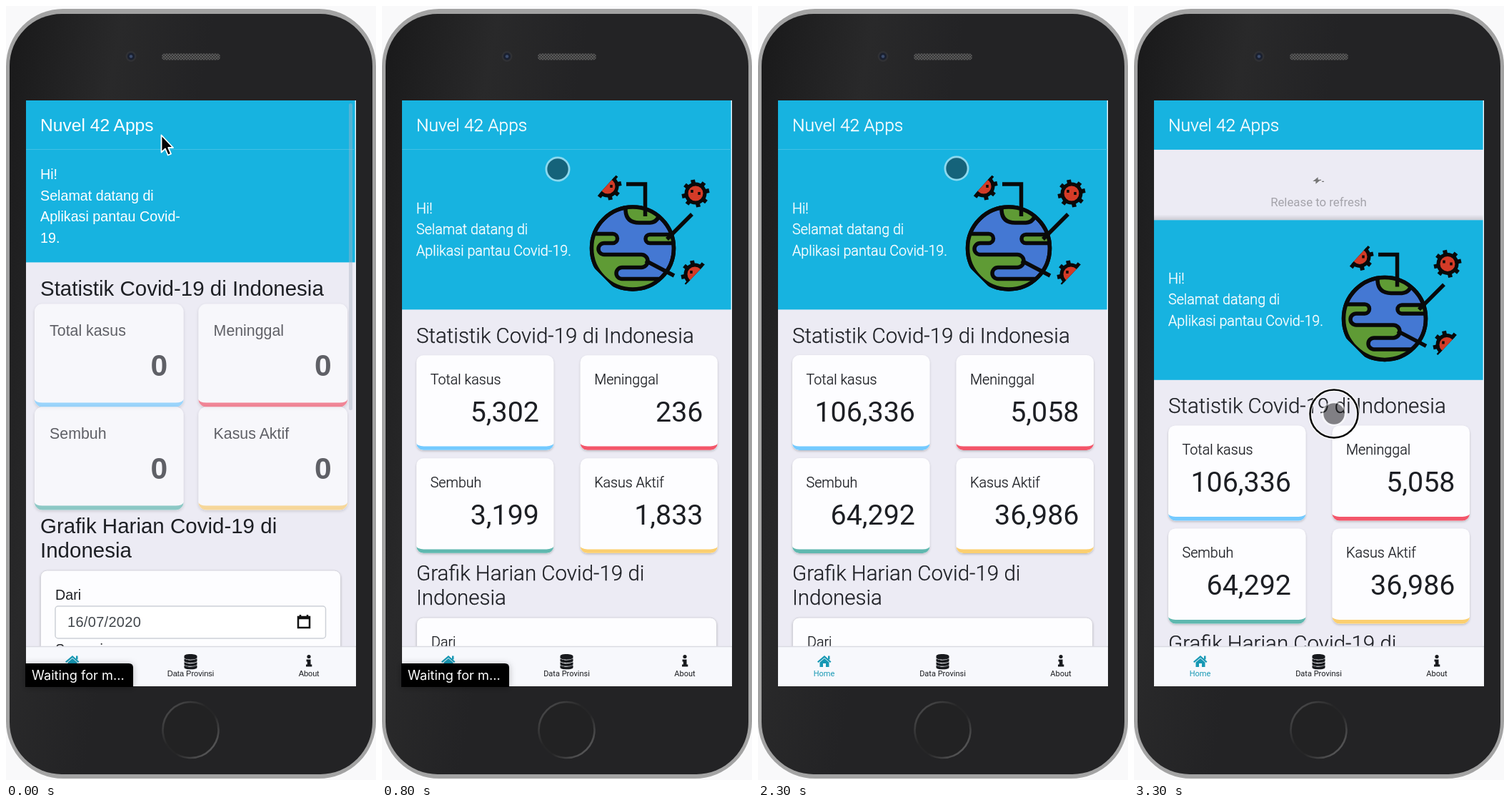
Animation, 518 px wide and 1082 px high, one loop 3400 ms. Source, as an HTML page:

```html
<!DOCTYPE html>
<html lang="id">
<head>
<meta charset="utf-8">
<title>Nuvel 42 Apps</title>
<style>
  html, body { margin: 0; width: 100%; height: 100%; overflow: hidden; background: #f9f9fa; }
  svg { display: block; width: 100vw; height: 100vh; }
  text { white-space: pre; }
  #app { font: 300 19.7px Roboto, sans-serif; fill: #1d1f24; }
  #app.plain { font-family: "Liberation Sans", Arial, sans-serif; font-weight: 400; }
  #below text { stroke: #1d1f24; stroke-width: .25px; }
  #app.plain text, #below .num, #below .date { stroke: none; }
  .title { font-size: 24.6px; }
  .title, .hero { fill: #fff; stroke: #fff; stroke-width: .35px; }
  .head { font-size: 29.5px; }
  .num { font-size: 39.4px; font-weight: 400; text-anchor: end; }
  .plain .num { font-weight: 700; }
  .nav { font-size: 11px; font-weight: 400; text-anchor: middle; }
  .pull { font-size: 16.8px; font-weight: 400; text-anchor: middle; fill: #a4a3aa; }
  .date { font: 400 20px "Liberation Sans", Arial, sans-serif; letter-spacing: .3px; fill: #41464b; }
  .wait { font: 400 18.2px Inter, sans-serif; fill: #fff; }
</style>
</head>
<body>
<svg viewBox="0 0 518 1082" preserveAspectRatio="none">
  <defs>
    <linearGradient id="body" x1="0" y1="0" x2=".5" y2=".18">
      <stop offset="0" stop-color="#19191a"/><stop offset=".55" stop-color="#29292a"/><stop offset="1" stop-color="#232325"/>
    </linearGradient>
    <linearGradient id="ring" x1="0" y1="0" x2="1" y2="1">
      <stop offset="0" stop-color="#555556"/><stop offset=".42" stop-color="#262627"/>
      <stop offset=".58" stop-color="#262627"/><stop offset="1" stop-color="#6c6c6d"/>
    </linearGradient>
    <linearGradient id="inset" x1="0" y1="0" x2="0" y2="1">
      <stop offset="0" stop-color="#000" stop-opacity="0"/><stop offset="1" stop-color="#000" stop-opacity=".14"/>
    </linearGradient>
    <pattern id="mesh" width="4" height="4" patternUnits="userSpaceOnUse">
      <rect width="4" height="4" fill="#5c5c5c"/><path d="M0 0h2v2h-2zM2 2h2v2h-2z" fill="#363637"/>
    </pattern>
    <filter id="soft" x="-10%" y="-10%" width="120%" height="125%">
      <feDropShadow dx="0" dy="1.5" stdDeviation="1.8" flood-color="#000" flood-opacity=".22"/>
    </filter>
    <filter id="glow" x="-20%" y="-60%" width="140%" height="220%">
      <feDropShadow dx="0" dy="1" stdDeviation="5" flood-color="#000" flood-opacity=".28"/>
    </filter>
    <clipPath id="view"><rect x="28" y="200" width="462" height="696"/></clipPath>
    <clipPath id="globe"><circle cx="351" cy="338.500" r="57.500"/></clipPath>
    <clipPath id="edge"><path d="M280 349L344 413H480V230H280Z"/></clipPath>
    <clipPath id="cutA"><path d="M301 266L329 235H345V275H301Z"/></clipPath>
    <clipPath id="cutC"><path d="M457 356L423 392H410V350H457Z"/></clipPath>
    <g id="virus" stroke="#090909">
      <path d="M-19 4L19 -4M-4 -19L4 19M-15 -12L15 12M-12 15L12 -15" stroke-width="6"/>
      <circle r="13" fill="#d33b27" stroke-width="5"/>
      <path d="M-5 -5V-1M5 -2V2" stroke-width="3.500"/>
    </g>
  </defs>

  <rect x="0" y="4" width="518" height="1076" rx="80" fill="#a3a3a3"/>
  <rect x="5" y="11" width="508" height="1063" rx="73" fill="url(#body)"/>
  <circle cx="175" cy="70.500" r="7.500" fill="#303134"/>
  <circle cx="175" cy="70.500" r="5" fill="#1a2030"/><circle cx="175" cy="70.500" r="2.300" fill="#3c4c6c"/>
  <rect x="218" y="66.500" width="82" height="9" rx="4.500" fill="url(#mesh)"/>
  <circle cx="258.500" cy="1012" r="39" fill="#222223" stroke="url(#ring)" stroke-width="2.600"/>

  <g id="app">
    <rect x="28" y="132" width="462" height="819" fill="#ecebf4"/>
    <g clip-path="url(#view)">
      <g id="pull">
        <rect x="28" y="193" width="461" height="8" fill="url(#inset)"/>
        <path id="spark" d="M252 146l5 -4v3h3l-5 4v-3zM260 145h2M263 147h3" fill="#777" stroke="#777" stroke-width="1.200"/>
        <text id="pullText" class="pull" x="258.500" y="182"></text>
      </g>
      <g id="page">
        <rect id="hero" x="28" y="200.900" width="461" fill="#17b3e0"/>
        <g id="heroText" class="hero"></g>
        <g id="art">
          <g fill="none" stroke="#090909" stroke-width="5.500" clip-path="url(#edge)">
            <circle cx="351" cy="338.500" r="57.500" fill="#4478d3"/>
            <g clip-path="url(#globe)" fill="#5f9b35">
              <path d="M285 318.500H323A6.500 6.500 0 0 1 323 331.500H311A8 8 0 0 0 311 347.500H363A9 9 0 0 1 363 365.500H336A8 8 0 0 0 336 381.500H400V405H285Z"/>
              <path d="M341 270V286Q342 303 360 303H375Q388 302 389 286V270Z"/>
              <path d="M420 319.500H375A6 6 0 0 0 375 331.500H420Z"/>
            </g>
            <circle cx="351" cy="338.500" r="57.500"/>
            <path d="M342 249H368.500V294M434 291L399 326M369 356L409 377"/>
          </g>
          <g clip-path="url(#cutA)"><use href="#virus" x="316" y="252"/></g>
          <use href="#virus" x="439" y="262"/>
          <g clip-path="url(#cutC)"><use href="#virus" x="438" y="375"/></g>
        </g>
        <g id="below">
          <text class="head" x="48" y="471">Statistik Covid-19 di Indonesia</text>
          <g id="cards"></g>
          <text class="head" x="48" y="803">Grafik Harian Covid-19 di</text>
          <text class="head" x="48" y="837">Indonesia</text>
          <rect x="48.500" y="855" width="420" height="300" rx="9" fill="#fdfdff" stroke="#d5d4dc" filter="url(#soft)"/>
          <text x="69" y="896">Dari</text>
          <rect x="69" y="905" width="378.500" height="45" rx="4" fill="#fff" stroke="#cdd1d7" stroke-width="1.500"/>
          <text class="date" x="86" y="934">16/07/2020</text>
          <path d="M409 920h16v15h-16zM409 922h16M412 917v3M422 917v3" fill="none" stroke="#111" stroke-width="2.500"/>
          <text x="69" y="972">Sampai</text>
        </g>
      </g>
    </g>

    <rect x="28" y="132" width="461" height="68.900" fill="#17b3e0"/>
    <path d="M489.300 132V951" stroke="#f6fbff" stroke-width="1.300"/>
    <path id="line" d="M28 200.500H489" stroke="#43bfe4"/>
    <text class="title" x="48" y="174.500">Nuvel 42 Apps</text>
    <rect id="bar" x="480" y="136" width="5" height="429" rx="2.500" fill="#a9b2c4" opacity=".42"/>

    <rect x="28" y="895" width="462" height="56" fill="#f7f8fc"/>
    <path d="M28 895.500H490" stroke="#dadbe2" stroke-width="1.500"/>
    <g fill="#1798b4">
      <path d="M83 916.500L93 908L102.500 916.500L101 918L93 911L84.500 918Z"/>
      <path d="M98 908.500h2.500v5h-2.500zM86.500 917.500L93 912L99.500 917.500V924H95V919H91V924H86.500Z"/>
      <text class="nav" x="92.500" y="937">Home</text>
    </g>
    <g fill="#181a1e">
      <path d="M249.500 909C249.500 905 267.500 905 267.500 909V911C267.500 914.500 249.500 914.500 249.500 911Z"/>
      <path id="band" d="M249.500 912.500Q258.500 916.500 267.500 912.500V915.500C267.500 919 249.500 919 249.500 915.500Z"/>
      <use href="#band" y="4.700"/><use href="#band" y="9.200"/>
      <circle cx="424" cy="909.500" r="2.600"/>
      <path d="M420.500 913.500H426.500V920.500H428.300V923.500H420V920.500H421.800V916.500H420.500Z"/>
      <text class="nav" x="258.500" y="937">Data Provinsi</text>
      <text class="nav" x="424" y="937">About</text>
    </g>
  </g>

  <g id="wait">
    <path d="M27 919H172Q178 919 178 925V952H27Z" fill="#050505" filter="url(#glow)"/>
    <text class="wait" x="36" y="942">Waiting for m...</text>
  </g>
  <path id="arrow" d="M217.500 180.500V204.500L223 199.500L226.800 208.500L231 206.700L227.200 198H234Z" fill="#050505" stroke="#fff" stroke-width="1.800" stroke-linejoin="round"/>
  <g id="touch">
    <circle r="16" fill="none" stroke="#fff" stroke-opacity=".5" stroke-width="3"/>
    <circle r="14.700" fill="#141414" fill-opacity=".5"/>
    <g id="press" fill="none">
      <circle r="33.500" stroke="#fff" stroke-opacity=".85" stroke-width="5"/>
      <circle r="33.500" stroke="#080808" stroke-width="2.600"/>
    </g>
  </g>
</svg>
<script>
const LOOP = 3400, STEP = 100, ZOOM = 1.23;
const $ = id => document.getElementById(id);
const show = (id, on) => $(id).setAttribute('display', on ? 'inline' : 'none');
const shift = (id, x, y) => $(id).setAttribute('transform', `translate(${x} ${y})`);

const stats = [
  { label: 'Total kasus', end: 106336, color: '#74caff', x: 48, y: 488 },
  { label: 'Meninggal', end: 5058, color: '#f3566a', x: 277.5, y: 488 },
  { label: 'Sembuh', end: 64292, color: '#5fb8af', x: 48, y: 632 },
  { label: 'Kasus Aktif', end: 36986, color: '#fbcf70', x: 277.5, y: 632 }
];
$('cards').innerHTML = stats.map(s => `<g>
  <rect x="${s.x}" y="${s.y}" width="192.500" height="133" rx="10" fill="#fdfdff" filter="url(#soft)"/>
  <path transform="translate(${s.x} ${s.y})" fill="${s.color}"
    d="M0 123A10 10 0 0 0 10 133H182.500A10 10 0 0 0 192.500 123A10 4.500 0 0 1 182.500 127.500H10A10 4.500 0 0 1 0 123Z"/>
  <text x="${s.x + 19.5}" y="${s.y + 41}">${s.label}</text>
  <text class="num" x="${s.x + 172}" y="${s.y + 93}">0</text></g>`).join('');
const cards = [...$('cards').children];
const nums = cards.map(c => c.querySelector('.num'));

// Each key is [time, ...values]
const scaleKeys = [[0, 1.083], [100, 1.04], [200, .95], [300, .917], [400, .955], [500, 1.02], [600, 1.005], [700, .98], [800, .998], [900, 1]];
const fadeKeys = [[0, .68], [300, .88], [600, 1]];
const touchKeys = [[600, 238, 205], [800, 246, 228], [1500, 256, 268], [2300, 278, 227], [2600, 277, 235],
  [2900, 276, 272], [3000, 276, 297], [3100, 277, 346], [3200, 279, 450], [3300, 280, 570]];

function at(keys, t) {
  const i = keys.findIndex(k => k[0] > t);
  if (i < 0) return keys[keys.length - 1].slice(1);
  if (i === 0) return keys[0].slice(1);
  const a = keys[i - 1], b = keys[i], p = (t - a[0]) / (b[0] - a[0]);
  return a.slice(1).map((v, n) => v + (b[n + 1] - v) * p);
}

// Linear run to the last 333, then an exponential ease-out
function count(end, t) {
  const p = (t - 775.742) / 485, near = end - 333;
  if (p <= 0) return 0;
  if (p < 1) return near * p;
  return p >= 2 ? end : near + 333 * (1 - 2 ** (-10 * (p - 1))) * 1024 / 1023;
}

function heroLines(lines, y) {
  return lines.map((s, i) => `<text x="48" y="${y + i * 29.5}">${s}</text>`).join('');
}
const shortHero = heroLines(['Hi!', 'Selamat datang di', 'Aplikasi pantau Covid-', '19.'], 242);
const wideHero = heroLines(['Hi!', 'Selamat datang di', 'Aplikasi pantau Covid-19.'], 289.5);
let wasReady = null;

function setLayout(ready) {
  if (ready === wasReady) return;
  wasReady = ready;
  $('app').setAttribute('class', ready ? '' : 'plain');
  $('heroText').innerHTML = ready ? wideHero : shortHero;
  $('hero').setAttribute('height', ready ? 223.5 : 157.5);
  shift('below', 0, ready ? 0 : -66);
  show('art', ready);
  show('bar', !ready);
}

function draw(t) {
  setLayout(t >= 200);

  const [scale] = at(scaleKeys, t), [fade] = at(fadeKeys, t);
  stats.forEach((s, i) => {
    const cx = s.x + 96.25, cy = s.y + 66.5;
    cards[i].setAttribute('transform', `translate(${cx} ${cy}) scale(${scale}) translate(${-cx} ${-cy})`);
    cards[i].setAttribute('opacity', fade);
    nums[i].textContent = Math.round(count(s.end, t)).toLocaleString('en-US');
  });

  const [x, y] = at(touchKeys, t), pressed = t >= 2900;
  shift('touch', x, y);
  show('touch', t >= 600);
  show('arrow', t < 600);
  show('press', pressed);
  show('wait', t < 1100);

  // Pull resistance grows until the content has moved 80 units
  const drag = pressed ? Math.max(0, y - 272) / ZOOM : 0;
  const dist = Math.min(1, drag / 150) * Math.min(80, drag);
  const pull = dist * ZOOM;
  shift('page', 0, pull);
  shift('pull', 0, pull);
  show('pull', pull > 0);
  show('spark', dist > 60);
  show('line', pull < 1);
  $('pullText').textContent = dist > 60 ? 'Release to refresh' : 'Pull down to refresh';
}

const start = performance.now();
function tick() {
  const t = (performance.now() - start) % LOOP;
  draw(Math.floor(t / STEP) * STEP);
  requestAnimationFrame(tick);
}
tick();
</script>
</body>
</html>
```
